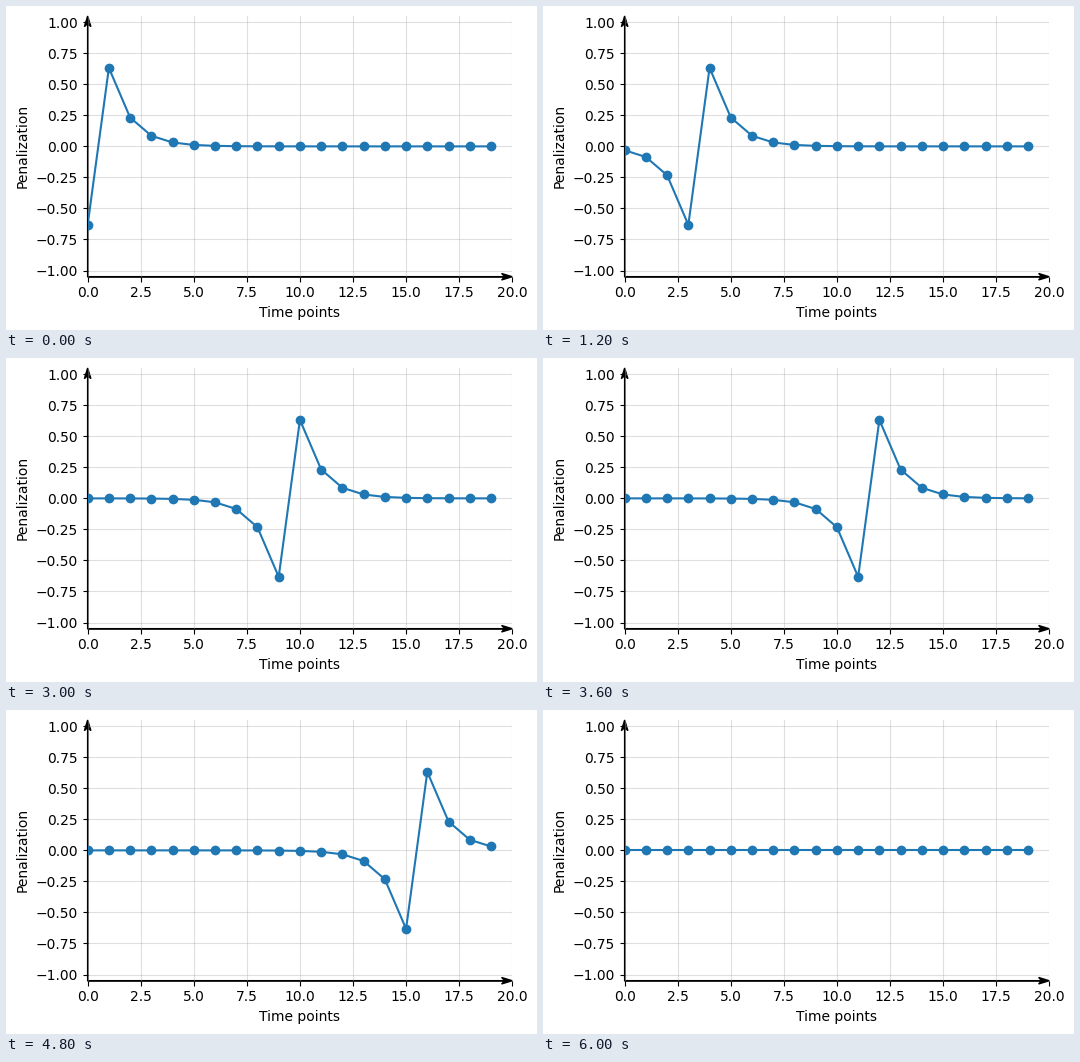
A matplotlib script that plays this animation: 531x324 px, repeating every 6300 ms.

```python
import numpy as np
import matplotlib.pyplot as plt
from matplotlib.animation import FuncAnimation

DPI = 100
WIDTH, HEIGHT = 531, 324
AXES_W, AXES_H = 424.55, 260.7
PAD = 0.1  # inches around the drawn content
STEPS = 21
POINTS = np.arange(20)


def penalization(step):
    """Decaying pulses on both sides of a sign change that moves right."""
    if step == STEPS - 1:
        return np.zeros(len(POINTS))
    split = max(step - 1, 0)
    after = POINTS > split
    distance = np.where(after, POINTS - split - 1, split - POINTS)
    return np.where(after, 1, -1) * (1 - np.exp(-1)) * np.exp(-distance)


def draw_axis_arrows(ax):
    x0, x1 = ax.get_xlim()
    y0, y1 = ax.get_ylim()
    dx, dy = x1 - x0, y1 - y0
    style = dict(fc="k", ec="k", lw=1, overhang=0.3,
                 length_includes_head=True, clip_on=False)
    ax.arrow(x0, y0, dx, 0, head_width=dy / 40, head_length=dx / 40, **style)
    ax.arrow(x0, y0, 0, dy,
             head_width=dx / 40 * AXES_H / AXES_W,
             head_length=dy / 40 * AXES_W / AXES_H, **style)


def fit_axes(fig, ax):
    """Shift the axes so the labels start one pad from the lower left corner."""
    box = fig.get_tightbbox()
    pos = ax.get_position()
    left = pos.x0 + (PAD - box.x0) * DPI / WIDTH
    bottom = pos.y0 + (PAD - box.y0) * DPI / HEIGHT
    ax.set_position([left, bottom, pos.width, pos.height])


plt.rcParams["font.family"] = "DejaVu Sans"
fig = plt.figure(figsize=(WIDTH / DPI, HEIGHT / DPI), dpi=DPI)
ax = fig.add_axes([82 / WIDTH, 53 / HEIGHT, AXES_W / WIDTH, AXES_H / HEIGHT])
ax.set(xlim=(0, 20), ylim=(-1.05, 1.05),
       xlabel="Time points", ylabel="Penalization")
ax.grid(alpha=0.4)
ax.spines[:].set_visible(False)
draw_axis_arrows(ax)
fit_axes(fig, ax)
line, = ax.plot(POINTS, penalization(0), "o-", color="C0")


def update(step):
    line.set_ydata(penalization(step))
    return line,


anim = FuncAnimation(fig, update, frames=STEPS, interval=300,
                     repeat=True, repeat_delay=0)
plt.show()
```
